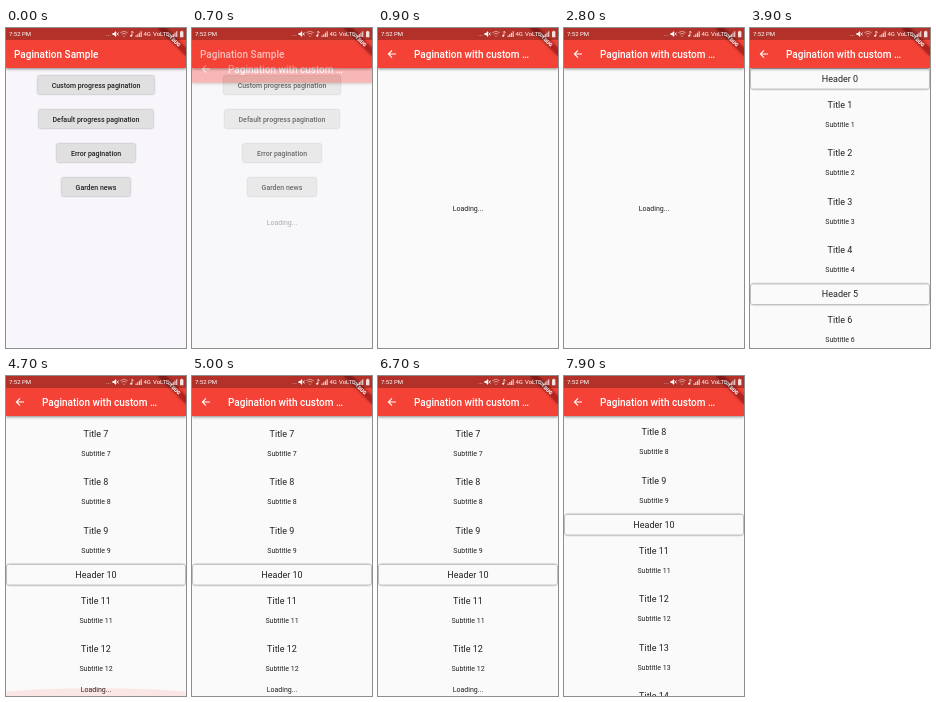
Animation, 180 px wide and 320 px high, one loop 8 s. Source, as an HTML page:

```html
<!DOCTYPE html>
<html lang="en">
<head>
<meta charset="utf-8">
<title>Pagination Sample</title>
<style>
  html, body { margin: 0; width: 100%; height: 100%; overflow: hidden; background: #fafafa; }
  svg { display: block; width: 100vw; height: 100vh; font-family: Roboto, sans-serif; }
  text { fill: #212121; }
  .mid { text-anchor: middle; }
  .title { font-size: 9px; }
  .small { font-size: 7px; }
  .button { font-size: 7px; font-weight: 500; }
  .bar { fill: #f44336; filter: drop-shadow(0 1px 1.5px #0007); }
  .heading { font-size: 10px; font-weight: 500; fill: #fff; }
  .raised { fill: #e0e0e0; filter: drop-shadow(0 .8px .8px #0006); }
  .card { fill: #fafafa; filter: drop-shadow(0 .5px 1.1px #000b); }
  .status, .status text { fill: #fff; font-size: 6px; }
</style>
</head>
<body>
<svg viewBox="0 0 180 320">
  <g id="home">
    <rect width="180" height="320" fill="#f8f6fb"/>
    <rect class="bar" width="180" height="40"/>
    <text class="heading" x="8" y="29.7">Pagination Sample</text>
    <g id="buttons"></g>
  </g>

  <g id="page">
    <rect width="180" height="320" fill="#fafafa"/>
    <text id="wait" class="small mid" x="90" y="182.6">Loading...</text>
    <g id="list"></g>
    <ellipse id="glow" cx="90" rx="270" fill="#f44336"/>
    <rect class="bar" width="180" height="40"/>
    <path d="M18 26H10.6M14 22.4L10.4 26L14 29.6" fill="none" stroke="#fff" stroke-width="1.1"/>
    <text class="heading" x="36" y="29.7">Pagination with custom …</text>
  </g>

  <g transform="translate(180) rotate(45)">
    <rect x="-20" y="14" width="40" height="6" fill="#b71c1ca0" style="filter:drop-shadow(0 0 1.5px #0008)"/>
    <text class="mid" y="18.8" style="font-size:5.1px;font-weight:900;fill:#fff">DEBUG</text>
  </g>

  <rect width="180" height="12" fill="#0004"/>
  <g class="status">
    <text x="3" y="8.2">7:52 PM</text>
    <text x="100" y="8.2">...</text>
    <path d="M106.5 5h1.5l2-2v6l-2-2h-1.5z"/>
    <path d="M110.5 4.5l2 3m0-3l-2 3" stroke="#fff" stroke-width=".7"/>
    <path d="M114.3 4.7q3.7-3 7.4 0M115.7 6.2q2.3-1.8 4.6 0M117 7.6l1 1l1-1" fill="none" stroke="#fff" stroke-width=".7" opacity=".7"/>
    <path d="M126 3v4.6M126 3.3l1.6 1.3" fill="none" stroke="#fff" stroke-width=".7"/>
    <circle cx="125.2" cy="7.8" r="1"/>
    <g id="signals" opacity=".75"></g>
    <text x="137.5" y="8.4">4G</text>
    <text x="147" y="8.4">VoLTE</text>
    <path d="M174 3.6h1v-.8h1.4v.8h1v5.6h-3.4z" opacity=".85"/>
  </g>
</svg>

<script>
const LOOP = 8000, STEP = 100, END_SCROLL = 283;
const TITLE_H = 48.5, HEADER_H = 21.5;
const $ = id => document.getElementById(id);
const clamp = v => Math.max(0, Math.min(1, v));
const show = (el, on) => el.style.display = on ? '' : 'none';
const label = (cls, y, s) => `<text class="${cls} mid" x="90" y="${y}">${s}</text>`;

$('buttons').innerHTML = [
  ['Custom progress pagination', 116],
  ['Default progress pagination', 114],
  ['Error pagination', 78],
  ['Garden news', 68]
].map(([s, w], i) => {
  const y = 57 + 34 * i;
  return `<rect class="raised" x="${90 - w / 2}" y="${y - 9}" width="${w}" height="18" rx="1"/>`
    + label('button', y + 2.6, s);
}).join('');

$('signals').innerHTML = [129.5, 165].map(x => [0, 1, 2, 3].map(i =>
  `<rect x="${x + i * 1.7}" y="${7.5 - i * 1.4}" width="1.2" height="${1.5 + i * 1.4}"/>`
).join('')).join('');

// Every fifth row is a header card, the others hold a title and a subtitle.
let rowY = 40, rows = '';
for (let i = 0; i < 15; i++) {
  const header = i % 5 === 0;
  if (i === 13) rows += `<g id="more">${label('small', rowY + 9.8, 'Loading...')}</g><g id="next">`;
  rows += header
    ? `<rect class="card" x="1" y="${rowY + .8}" width="178" height="20" rx="2"/>`
      + label('title', rowY + 13.8, 'Header ' + i)
    : label('title', rowY + 18.3, 'Title ' + i) + label('small', rowY + 37, 'Subtitle ' + i);
  rowY += header ? HEADER_H : TITLE_H;
}
$('list').innerHTML = rows + '</g>';

// Cubic Bezier easing (.4, 0, .2, 1), solved by bisection.
function ease(x) {
  let lo = 0, hi = 1, u = .5;
  for (let i = 0; i < 20; i++) {
    u = (lo + hi) / 2;
    const bx = 1.2 * u * (1 - u) ** 2 + .6 * u * u * (1 - u) + u ** 3;
    if (bx < x) lo = u; else hi = u;
  }
  return u * u * (3 - 2 * u);
}

function draw(now) {
  const t = Math.floor(now % LOOP / STEP) * STEP;

  const enter = clamp((t - 540) / 300);
  show($('page'), enter > 0);
  $('page').setAttribute('opacity', enter ** 1.7);
  $('page').setAttribute('transform', `translate(0 ${enter < 1 ? 80 * (1 - ease(enter)) : 0})`);

  show($('wait'), t < 3900);
  show($('list'), t >= 3900);
  show($('more'), t < 7500);
  show($('next'), t >= 7500);
  const scroll = END_SCROLL * clamp((t - 4300) / 200) + (t >= 7900 ? 50 : 0);
  $('list').setAttribute('transform', `translate(0 ${-scroll})`);

  const fade = t < 4500 ? 0 : (1 - clamp((t - 4500) / 500)) ** 2;
  const flat = .6 * fade;
  show($('glow'), fade > 0);
  $('glow').setAttribute('opacity', .3 * fade);
  $('glow').setAttribute('ry', 270 * flat);
  $('glow').setAttribute('cy', 320 + 233.8 * flat);

  requestAnimationFrame(() => draw(performance.now()));
}
draw(performance.now());
</script>
</body>
</html>
```
